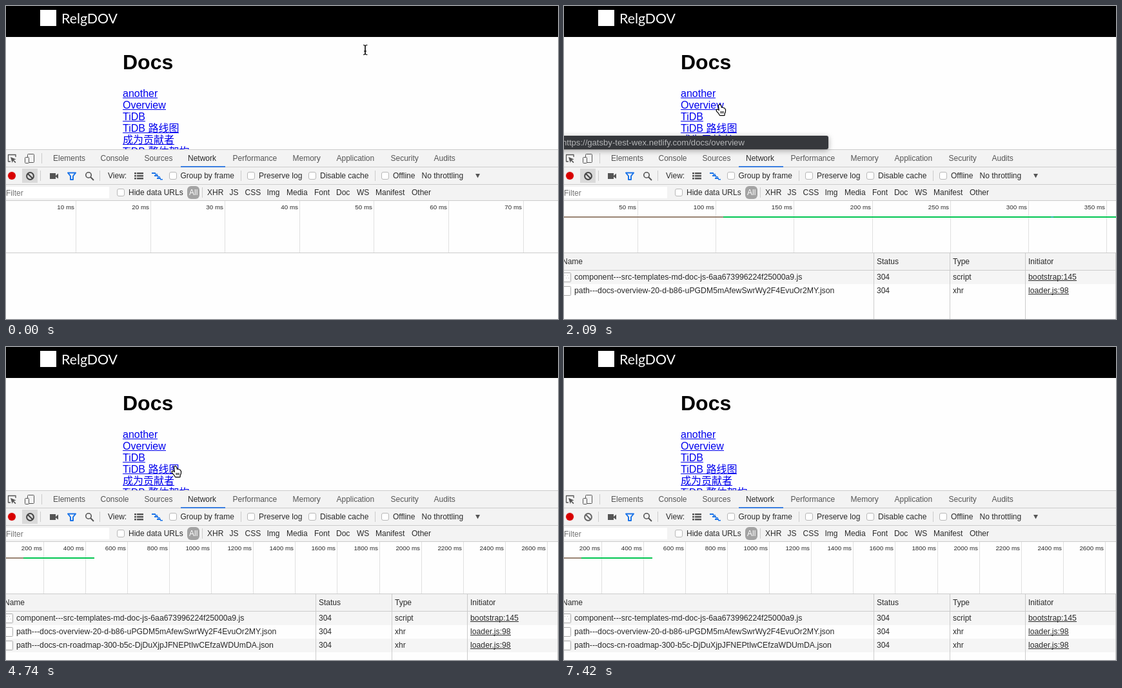
Recreate the animation shown at these times as an HTML page with a canvas. Size 856x485 px, loop 7.52 s.

```html
<!DOCTYPE html>
<html lang="zh-CN">
<head>
<meta charset="utf-8">
<title>Docs prefetch</title>
<style>
html, body { margin: 0; width: 100%; height: 100%; overflow: hidden; background: #fff; }
canvas { display: block; }
</style>
</head>
<body>
<canvas id="stage" width="856" height="485"></canvas>
<script>
const W = 856, H = 485, LOOP = 7520;
const SANS = '"Liberation Sans", Arial, "Noto Sans CJK SC", "Noto Sans CJK", sans-serif';
const GREY = '#555', INK = '#2a2a2a', BAR = '#f3f3f3', LINE = '#cccccc', BLUE = '#1a73e8';
const HOST = 'https://gatsby-test-wex.netlify.com/';
let g = document.getElementById('stage').getContext('2d');
const page = g;
const layer = document.createElement('canvas');
layer.width = W;
layer.height = H;
const layerCtx = layer.getContext('2d');

// Bursts of movement: first step, last step, number of steps
const BURSTS = [[300, 1200, 7], [1350, 2090, 6], [2830, 3860, 8], [4010, 4890, 7], [5490, 6220, 6]];

// Pointer track: time, shape, hotspot
const TRACK = [
  [150, ibeam, 557, 68], [600, ibeam, 440, 95], [1200, ibeam, 276, 140], [1498, ibeam, 248, 149],
  [1640, hand, 242, 151], [1800, hand, 240, 153], [2700, hand, 240, 153],
  [2825, ibeam, 256, 148], [2970, arrow, 282, 135], [3271, arrow, 315, 127],
  [3418, arrow, 317, 119], [3565, arrow, 308, 130], [3860, arrow, 282, 164],
  [4303, arrow, 275, 176], [4440, hand, 266, 181], [4590, hand, 261, 185], [5400, hand, 261, 185],
  [5485, arrow, 300, 172], [5636, arrow, 410, 126], [5782, arrow, 541, 84],
  [5928, arrow, 640, 62], [6074, arrow, 730, 130], [6220, arrow, 800, 226]
];

const SCALES = [
  { first: 108.4, gap: 115.6, unit: 10 },
  { first: 114.4, gap: 121.2, unit: 50, split: 247, end: W },
  { first: 58.4, gap: 65.08, unit: 200, split: 27, end: 137 }
];

const REQUESTS = [
  ['component---src-templates-md-doc-js-6aa673996224f25000a9.js', 'script', 'bootstrap:145'],
  ['path---docs-overview-20-d-b86-uPGDM5mAfewSwrWy2F4EvuOr2MY.json', 'xhr', 'loader.js:98'],
  ['path---docs-cn-roadmap-300-b5c-DjDuXjpJFNEPtIwCEfzaWDUmDA.json', 'xhr', 'loader.js:98']
];

function rect(x, y, w, h, color) {
  g.fillStyle = color;
  g.fillRect(x, y, w, h);
}

function text(str, x, y, size = 12, color = INK, font = SANS, weight = '') {
  g.font = `${weight} ${size}px ${font}`;
  g.fillStyle = color;
  g.fillText(str, x, y);
  return g.measureText(str).width;
}

function underlined(str, x, y, size, color) {
  const w = text(str, x, y, size, color);
  rect(x, y + 1, Math.round(w), 1, color);
}

function shape(points, fill, stroke, width = 1, closed = true) {
  g.beginPath();
  points.forEach(([x, y]) => g.lineTo(x, y));
  if (closed) g.closePath();
  g.lineWidth = width;
  g.lineJoin = 'round';
  if (stroke) { g.strokeStyle = stroke; g.stroke(); }
  if (fill) { g.fillStyle = fill; g.fill(); }
}

function circle(x, y, r, fill, stroke, width) {
  g.beginPath();
  g.arc(x, y, r, 0, Math.PI * 2);
  if (fill) { g.fillStyle = fill; g.fill(); }
  if (stroke) { g.strokeStyle = stroke; g.lineWidth = width; g.stroke(); }
}

function rounded(x, y, w, h, r, fill, stroke) {
  g.beginPath();
  g.roundRect(x, y, w, h, r);
  if (fill) { g.fillStyle = fill; g.fill(); }
  if (stroke) { g.strokeStyle = stroke; g.lineWidth = 1; g.stroke(); }
}

const checkbox = (x, y) => rounded(x + .5, y + .5, 11, 11, 2.5, '#fff', '#b8b8b8');
const divider = (x, y) => rect(x, y, 1, 16, LINE);

function ibeam() {
  for (const [color, width] of [['#fff', 3], ['#111', 1.2]]) {
    shape([[-3, -7.5], [-1.5, -7.5], [0, -6], [0, 6], [-1.5, 7.5], [-3, 7.5]], null, color, width, false);
    shape([[3.5, -7.5], [1.5, -7.5], [0, -6], [0, 6], [1.5, 7.5], [3.5, 7.5]], null, color, width, false);
    shape([[-2, 2], [2, 2]], null, color, width, false);
  }
}

function arrow() {
  shape([[.8, .8], [.8, 12.6], [3.5, 10.2], [5.3, 14.6], [7.5, 13.6], [5.6, 9.4], [9, 9.2]], '#000', '#fff', 2);
}

function hand() {
  shape([[0, 1], [1.5, 0], [3, 1.3], [4, 5], [6, 4.6], [7, 5.6], [8.7, 5.6], [9.3, 7], [10, 7.8],
    [9.8, 11], [8.5, 14], [8.5, 16], [1.8, 16], [0, 13], [-3, 9.8], [-3.3, 8], [-1.5, 7.7], [1, 9.4]],
    '#fff', '#000', 2.4);
  for (const x of [3, 5, 7]) shape([[x, 10], [x + .2, 13.5]], null, '#000', 1, false);
}

function drawPage() {
  rect(0, 0, W, H, '#fefefe');
  rect(0, 0, W, 48, '#000');
  rect(53, 6, 25, 25, '#fff');
  text('RelgDOV', 86, 27, 21.3, '#fff', 'Lato, sans-serif');
  text('Docs', 181, 98, 32, '#000', SANS, 'bold');
  ['another', 'Overview', 'TiDB', 'TiDB 路线图', '成为贡献者', 'TiDB 整体架构']
    .forEach((label, i) => underlined(label, 181, 141 + i * 18, 16, '#0000ee'));
}

function drawTabs() {
  rect(0, 222, W, 80, BAR);
  for (const y of [222, 249, 276, 301]) rect(0, y, W, 1, LINE);
  shape([[7, 241], [3.5, 241], [3.5, 230.5], [15, 230.5], [15, 234]], null, GREY, 1.3, false);
  shape([[7, 234], [15.5, 237.5], [12, 238.7], [15.5, 242], [14.3, 243.2], [11, 239.8], [9.6, 243]], GREY);
  rounded(33.5, 229.5, 10, 13, 1, null, GREY);
  rounded(29.5, 234.5, 6, 9, 1, BAR, GREY);
  divider(55, 228);
  rect(271, 248, 69, 2, '#3b7fe0');
  const tabs = { Elements: 73, Console: 146.5, Sources: 214.5, Network: 282, Performance: 351.5,
    Memory: 444.5, Application: 512.5, Security: 596.5, Audits: 663.5 };
  for (const name in tabs) text(name, tabs[name], 240, 12, name === 'Network' ? INK : GREY);
}

function drawToolbar(hovered) {
  circle(9, 263, 7, '#f0dcdc');
  circle(9, 263, 6, '#d80000');
  if (hovered) rect(25, 252, 24, 22, '#dadada');
  const ink = hovered ? '#444' : '#666';
  circle(37.5, 263.5, 5.4, null, ink, 2);
  shape([[34, 260], [41, 267]], null, ink, 2, false);
  divider(53, 255);

  rect(68, 259, 9, 9, GREY);
  shape([[77, 263], [81, 259.5], [81, 267.5], [77, 264.5]], GREY);
  shape([[96, 258.5], [108, 258.5], [104, 263.5], [104, 269], [100, 269], [100, 263.5]], null, BLUE, 2);
  circle(128, 262, 4.2, null, GREY, 1.6);
  shape([[131, 265], [136, 270]], null, GREY, 2, false);
  divider(145, 255);
  text('View:', 158, 267);
  for (let i = 0; i < 3; i++) {
    rect(199, 258 + i * 4, 3, 2.5, GREY);
    rect(203, 258 + i * 4, 10, 2.5, GREY);
    rect(226 + i * 4, 258 + i * 4, 6, 2, BLUE);
    rect(231 + i * 4, 260 + i * 4, 4, 1.5, BLUE);
  }
  [253, 374, 469, 582].forEach(x => checkbox(x, 257));
  [364, 572].forEach(x => divider(x, 255));
  const labels = { 'Group by frame': 270.5, 'Preserve log': 392, 'Disable cache': 487, Offline: 600, 'No throttling': 644.5 };
  for (const label in labels) text(label, labels[label], 267);
  shape([[728, 260], [735, 260], [731.5, 266.5]], GREY);

  rect(0, 280, 160, 18, '#fff');
  text('Filter', 0, 294, 12, '#757575');
  checkbox(172, 283);
  text('Hide data URLs', 190, 293);
  rounded(281, 279, 19, 20, 6, '#a3a3a3');
  text('All', 284, 293, 12, '#fff');
  divider(304, 281);
  const types = { XHR: 312, JS: 346.5, CSS: 370.5, Img: 404.5, Media: 435, Font: 478, Doc: 512, WS: 544, Manifest: 573, Other: 629 };
  for (const type in types) text(type, types[type], 293);
}

function drawTimeline({ first, gap, unit, split, end }) {
  rect(0, 302, W, 80, '#fefefe');
  g.textAlign = 'right';
  for (let i = 0, x = first; x < W; i++, x += gap) {
    rect(Math.floor(x), 302, 1, 80, '#e0e0e0');
    text(`${unit * (i + 1)} ms`, Math.floor(x) - 2, 315, 9.8);
  }
  g.textAlign = 'left';
  if (end) {
    rect(0, 326, split, 2, '#9a8473');
    rect(split, 326, end - split, 2, '#00c651');
    if (end === W) rect(755, 326, 4, 2, '#18b5a5');
  }
  rect(0, 382, W, 1, LINE);
}

function drawTable(count) {
  rect(0, 383, W, 26, BAR);
  rect(0, 409, W, 1, LINE);
  const columns = [-3, 485, 603, 720];
  ['Name', 'Status', 'Type', 'Initiator'].forEach((head, i) => text(head, columns[i], 400));
  for (let i = 0; i < count; i++) {
    const [name, type, initiator] = REQUESTS[i], y = 410 + i * 21;
    if (i % 2 === 0) rect(0, y, W, 21, '#f5f5f5');
    rounded(-1.5, y + 3.5, 12, 14, 1, '#fff', '#aaa');
    if (i === 0) for (let k = 0; k < 4; k++) rect(1 + k * 2, y + 7 + (k % 2) * 4, 1, 1, '#bbb');
    text(name, 16, y + 14, 12.25);
    text('304', 485, y + 14);
    text(type, 603, y + 14);
    underlined(initiator, 720, y + 14, 12.25, INK);
  }
  [480, 598, 715, 855].forEach(x => rect(x, 383, 1, H - 383, LINE));
}

function drawBubble(path, alpha) {
  if (alpha <= 0) return;
  g = layerCtx;
  g.clearRect(0, 0, W, H);
  g.shadowColor = 'rgba(0,0,0,.35)';
  g.shadowBlur = 8;
  g.shadowOffsetY = 2;
  rounded(-10, 201, 420, 21, 3, '#36383c');
  g.shadowColor = 'transparent';
  text(HOST + path, -3, 216, 13.1, '#b4b5b7');
  g = page;
  g.globalAlpha = alpha;
  g.drawImage(layer, 0, 0);
  g.globalAlpha = 1;
}

function drawPointer(t) {
  let i = TRACK.length - 1;
  while (i > 0 && TRACK[i][0] > t) i--;
  const [t0, draw, x0, y0] = TRACK[i];
  const [t1, , x1, y1] = TRACK[i + 1] || [t0 + 1, draw, x0, y0];
  const k = Math.min(1, Math.max(0, (t - t0) / (t1 - t0)));
  g.save();
  g.translate(Math.round(x0 + (x1 - x0) * k), Math.round(y0 + (y1 - y0) * k));
  draw();
  g.restore();
}

// Holds the clock on the steps of each burst
function snap(t) {
  let held = 0;
  for (const [start, end, steps] of BURSTS) {
    if (t < start) break;
    const step = (end - start) / (steps - 1);
    held = Math.min(end, start + Math.floor((t - start + 5) / step) * step);
  }
  return held;
}

const fade = (t, start, end) => Math.min(1, Math.max(0, (end - t) / (end - start)));

function render(now) {
  const time = now % LOOP, t = snap(time);
  const requests = t < 1790 ? 0 : t < 4590 ? 2 : 3;
  drawPage();
  drawTabs();
  drawToolbar(time < 7420);
  drawTimeline(SCALES[Math.max(0, requests - 1)]);
  if (requests) drawTable(requests);
  if (t >= 4885) drawBubble('docs-cn/ROADMAP', fade(t, 5700, 5900));
  else if (t >= 1940) drawBubble('docs/overview', fade(t, 3100, 3310));
  if (time < 6520) drawPointer(t);
}

const began = performance.now();
function tick() {
  render(performance.now() - began);
  requestAnimationFrame(tick);
}
tick();
</script>
</body>
</html>
```
